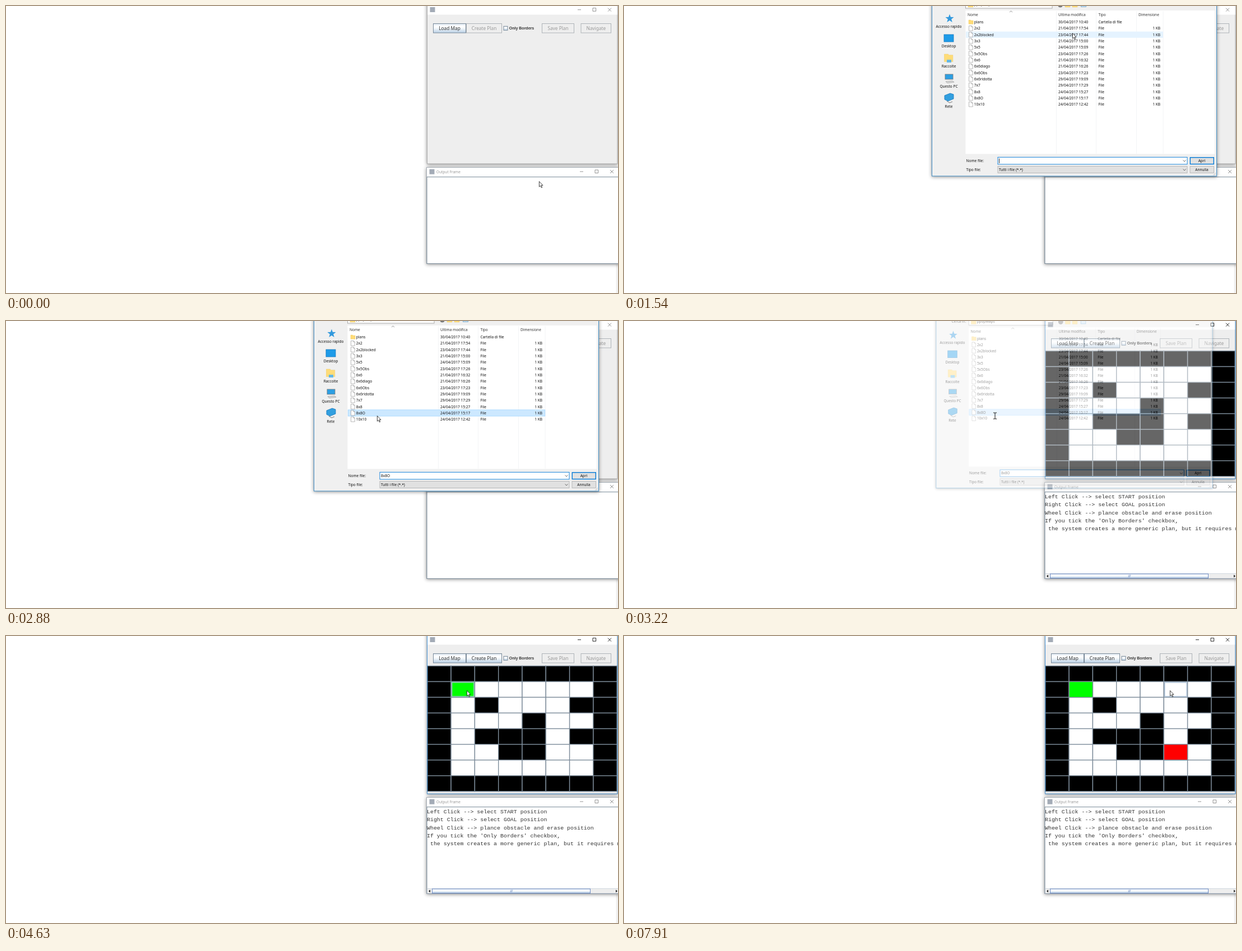
An HTML page that plays this animation: 1092x513 px, repeating every 8 s.

```html
<!DOCTYPE html>
<html lang="en">
<head>
<meta charset="utf-8">
<title>Map planner</title>
<style>
  html, body { margin: 0; width: 100%; height: 100%; overflow: hidden; background: #fff; }
  svg { display: block; width: 1092px; height: 513px; }
  text { white-space: pre; }
  .swing { font: 8.3px "Noto Sans", sans-serif; }
  .ui { font: 6.55px "Noto Sans", "Open Sans", sans-serif; }
  .bold { font: bold 7px "Liberation Sans", sans-serif; }
  .mono { font: 9.94px "Liberation Mono", monospace; }
  .shadow { filter: drop-shadow(0 1px 3px rgba(0, 0, 0, .45)); }
</style>
</head>
<body>
<svg id="stage" viewBox="0 0 1092 513">
  <defs>
    <linearGradient id="metal" x2="0" y2="1">
      <stop offset="0" stop-color="#dfe9f3"/><stop offset=".3" stop-color="#fff"/>
      <stop offset=".5" stop-color="#f4f8fb"/><stop offset="1" stop-color="#b8cfe5"/>
    </linearGradient>
  </defs>
</svg>
<script>
const LOOP = 8000, COL = 42.3, ROW = 28.03, GRID_X = 751.8, GRID_Y = 53.5;
const OPEN = 1320, LOADED = 3220, CLOSED = 3320, START_SET = 4630, GOAL_SET = 7260;
const MAP = ['########', '#......#', '#.#...##', '#...#..#',
             '#.###.##', '#..##..#', '#......#', '########'];

// Pointer positions, each held until the next: [ms, x, y]
const POINTER = [
  [0, 951, 313], [100, 947, 300], [200, 928, 253], [300, 890, 180], [400, 850, 110],
  [500, 815, 56], [570, 799, 25], [670, 798, 33], [770, 799, 41], [1100, 800, 47], [1220, 800, 48],
  [1760, 785, 63], [1880, 737, 108], [1980, 700, 145], [2100, 688, 156], [2200, 685, 158],
  [2660, 673, 164], [2770, 662, 169],
  [3530, 672, 162], [3640, 704, 143], [3740, 752, 122], [3850, 800, 103], [3970, 812, 88],
  [4070, 798, 58], [4190, 780, 38], [4300, 772, 33], [4630, 822, 97],
  [4960, 834, 106], [5080, 868, 130], [5180, 915, 164], [5300, 954, 202], [5400, 977, 224],
  [5520, 984, 230], [5950, 984, 229], [6480, 983, 219], [6600, 981, 204],
  [7790, 978, 150], [7910, 974, 97]
];

const FILES = [
  ['plans', '30/04/2017 10:40'], ['2x2', '21/04/2017 17:54'], ['2x2blocked', '23/04/2017 17:44'],
  ['3x3', '21/04/2017 15:00'], ['5x5', '24/04/2017 15:09'], ['5x5Obs', '23/04/2017 17:26'],
  ['6x6', '21/04/2017 16:32'], ['6x6diago', '21/04/2017 16:26'], ['6x6Obs', '23/04/2017 17:23'],
  ['6x6ridotta', '29/04/2017 19:09'], ['7x7', '29/04/2017 17:29'], ['8x8', '24/04/2017 15:27'],
  ['8x8O', '24/04/2017 15:17'], ['10x10', '24/04/2017 12:42']
];
const FILE_Y = 28.6, FILE_STEP = 11.32, CHOSEN = 12;

const rect = (x, y, w, h, fill, stroke = 'none', extra = '') =>
  `<rect x="${x}" y="${y}" width="${w}" height="${h}" fill="${fill}" stroke="${stroke}" ${extra}/>`;
const path = (d, stroke, fill = 'none', extra = '') =>
  `<path d="${d}" stroke="${stroke}" fill="${fill}" ${extra}/>`;
const text = (x, y, str, cls = 'ui', fill = '#111', anchor = 'start') =>
  `<text x="${x}" y="${y}" class="${cls}" fill="${fill}" text-anchor="${anchor}">${str}</text>`;
const group = (id, body) => `<g id="${id}">${body}</g>`;

const controls = (x, y) =>
  path(`M${x - 3} ${y}h6M${x + 24} ${y - 3}h5.6v5.6h-5.6zM${x + 51} ${y - 3}l6 6m0-6l-6 6`,
       'currentColor', 'none', 'stroke-width=".9"');
const appIcon = (x, y) => rect(x, y, 9, 9, '#a3abb6');

function button(x, w, label, enabled) {
  return rect(x + .5, 31.5, w - 1, 16.5, enabled ? 'url(#metal)' : '#eee', enabled ? '#7a8a99' : '#aeb3b8') +
    text(x + w / 2, 42.9, label, 'swing', enabled ? '#333' : '#999', 'middle');
}

const cell = (col, row, fill) =>
  rect(GRID_X + col * COL, GRID_Y + row * ROW, COL, ROW, fill, '#7f8e9c', 'stroke-width="1.4"');

function mainWindow() {
  const cells = MAP.map((line, r) =>
    [...line].map((ch, c) => cell(c, r, ch === '#' ? '#000' : '#fff')).join('')).join('');
  return rect(751.5, -20, 339.5, 302, '#eee', '#aaa', 'class="shadow"') +
    rect(752, 0, 338.6, 15.5, '#fff') + appIcon(756.5, 2) +
    group('controls', controls(1023, 6.7)) +
    button(762, 59, 'Load Map', true) +
    group('createOff', button(821, 64, 'Create Plan', false)) +
    group('createOn', button(821, 64, 'Create Plan', true)) +
    rect(888, 36.3, 7, 7, 'url(#metal)', '#7a8a99') + text(897.8, 42.3, 'Only Borders', 'bold', '#333') +
    button(956, 58, 'Save Plan', false) + button(1025.5, 54.5, 'Navigate', false) +
    rect(763.3, 32.6, 56.5, 14.4, 'none', '#8fb0d0', 'id="loadHover" stroke-width="1.4"') +
    group('map', cells + group('start', cell(1, 1, '#0f0')) + group('goal', cell(5, 5, '#f00')) +
      rect(0, 0, COL - 3, ROW - 3, 'none', '#a9bfd6', 'id="cellHover" stroke-width="1.4"')) +
    path('M751.5 0V282.2H1091V0', '#4a95d6', 'none', 'id="activeEdge"');
}

function outputWindow() {
  const lines = ['Left Click --> select START position', 'Right Click --> select GOAL position',
    'Wheel Click --> plance obstacle and erase position', "If you tick the 'Only Borders' checkbox,",
    ' the system creates a more generic plan, but it requires more memory'];
  const bar = rect(751.5, 451.5, 341, 8.5, '#eee', '#b8c4d0', 'stroke-width=".6"') +
    rect(760.5, 452, 282, 7.6, 'url(#metal)', '#6382bf', 'stroke-width=".9"') +
    path('M900 458l1.4-4.4m.8 4.4l1.4-4.4', '#6382bf', 'none', 'stroke-width=".8"') +
    path('M757 453.4v5l-3-2.5zM1088 453.4v5l3-2.5z', 'none', '#222');
  return rect(750.5, 288.5, 350, 172, '#fff', '#a5adb5', 'class="shadow"') +
    appIcon(755.5, 291.7) + text(767.8, 298.6, 'Output Frame', 'ui', '#999') +
    `<g color="#888">${controls(1027, 296)}</g>` +
    path('M1092 305.6H751V460.4H1092', '#7a8a99') +
    group('help', lines.map((line, i) =>
      text(751, 317 + i * 14.25, line.replace('>', '&gt;'), 'mono', '#333')).join('') + bar);
}

const folder = (x, y, s = 1) =>
  path(`M${x} ${y}h${4 * s}l${s} ${s}h${4 * s}v${7 * s}h${-9 * s}z`, '#e8c257', '#ffdc78', 'stroke-width=".4"');
const page = (x, y) =>
  path(`M${x} ${y}h4.6l2.2 2.2v6.6h-6.8zm4.6 0v2.2h2.2`, '#999', '#fff', 'stroke-width=".7"');

function sidebar() {
  const star = Array.from({ length: 10 }, (_, i) => {
    const a = i * Math.PI / 5, r = i % 2 ? 3.3 : 8;
    return `${(581 + r * Math.sin(a)).toFixed(1)} ${(22.5 - r * Math.cos(a)).toFixed(1)}`;
  }).join('L');
  const screen = y => rect(573, y, 14, 9, '#2d9fe3', '#777', 'stroke-width=".8"');
  const icons = path(`M${star}z`, 'none', '#3299dd') +
    rect(571, 51, 17, 13, '#1e9be8', '#1779bd', 'stroke-width=".8"') +
    folder(571.5, 86, 1.7) + rect(576, 96, 8, 5, '#64b7e6') +
    screen(122) + path('M574 135l12-1 3 2-12 1.6z', '#888', '#ddd', 'stroke-width=".6"') +
    path('M572 160l10-4 6 2v8l-10 4-6-3z', '#1779bd', '#329fdf', 'stroke-width=".8"') +
    path('M576 170l5 3 5-2', '#777');
  return icons + ['Accesso rapido', 'Desktop', 'Raccolte', 'Questo PC', 'Rete']
    .map((label, i) => text(579.5, 38.6 + i * 35.85, label, 'ui', '#111', 'middle')).join('');
}

function dialog() {
  const rows = FILES.map(([name, date], i) => {
    const mid = FILE_Y + i * FILE_STEP, y = mid + 2.4;
    return (i ? page(615.5, mid - 4.5) : folder(615, mid - 3.5, .9)) + text(624.8, y, name) +
      text(775, y, date) + text(846.5, y, i ? 'File' : 'Cartella di file') +
      (i ? text(957, y, '1 KB', 'ui', '#111', 'end') : '');
  }).join('');
  const heads = [[613, 'Nome'], [775, 'Ultima modifica'], [846.5, 'Tipo'], [918, 'Dimensione']]
    .map(([x, label]) => text(x, 18, label, 'ui', '#333')).join('');
  const down = y => path(`M997.5 ${y}l2.5 2.5 2.5-2.5`, '#444', 'none', 'stroke-width=".8"');
  const tip = rect(687.5, 166.5, 117, 29, '#fff', '#999', 'stroke-width=".8" class="shadow"') +
    ['Tipo - File', 'Dimensione - 935 byte', 'Ultima modifica - 24/04/2017 15:27']
      .map((line, i) => text(690.5, 174 + i * 9, line, 'ui', '#666')).join('');
  return rect(549.5, -62, 508, 366, '#f0f0f0', '#3f8cc4', 'class="shadow"') +
    text(578, -.6, 'Cerca in:') + rect(609.5, -9, 154.5, 13, '#fff', '#999', 'stroke-width=".8"') +
    folder(614, -6) + text(624.5, -.6, 'ppopMaps') +
    '<circle cx="778.5" cy="-2" r="4.5" fill="#777"/>' + folder(787, -6) + folder(800, -6) +
    rect(815.5, -6, 9, 7.5, '#cfe6f7', '#6aa5cf', 'stroke-width=".8"') +
    sidebar() + rect(609.5, 8, 444.5, 256.5, '#fff') +
    path('M771.5 9V264M842.5 9V264M914.5 9V264M962 9V264', '#f0f2f4', 'none', 'stroke-width=".8"') +
    path('M688 11l2.5-2 2.5 2', '#777', 'none', 'stroke-width=".8"') + heads +
    rect(610, 0, 352, 11.2, '#e5f3ff', 'none', 'id="rowHover"') +
    rect(610.3, FILE_Y + CHOSEN * FILE_STEP - 5.6, 351.5, 11.2, '#cce8ff', '#99d1ff', 'id="rowChosen" stroke-width=".7"') +
    rows + group('tip', tip) +
    text(610.5, 279, 'Nome file:') + text(610.5, 295, 'Tipo file:') +
    rect(667, 270.3, 338, 12.6, '#fff', '#0078d7', 'stroke-width=".9"') + down(275.5) +
    rect(667, 286.5, 338, 12, '#e1e1e1', '#adadad', 'stroke-width=".8"') + down(291.5) +
    text(669, 295, 'Tutti i file (*.*)') +
    path('M669.5 272.5v8.5', '#000', 'none', 'id="caret" stroke-width=".8"') +
    group('fileName', text(669, 279, '8x8O')) +
    rect(1010.3, 270.8, 42, 11.8, '#e1e1e1', '#0078d7', 'stroke-width="1.4"') +
    text(1031, 279, 'Apri', 'ui', '#111', 'middle') +
    rect(1010, 286.5, 42.6, 11.8, '#e1e1e1', '#adadad', 'stroke-width=".8"') +
    text(1031, 295, 'Annulla', 'ui', '#111', 'middle') +
    path('M1051 303l5-5m-2.5 5l2.5-2.5', '#bbb', 'none', 'stroke-width=".8"');
}

const stage = document.getElementById('stage');
stage.insertAdjacentHTML('beforeend',
  rect(1088.5, 462, 4, 51, '#f0f0f0') + mainWindow() + outputWindow() + group('dialog', dialog()) +
  group('arrow', path('M.4.6V10.2L2.6 8.2 4.3 11.8 5.7 11.2 4.1 7.6H7z', '#111', '#fff', 'stroke-width=".8"')) +
  group('beam', path('M-3-5.5h2.2l.8.7.8-.7H3M0-5V5M-3 5.5h2.2L0 4.8l.8.7H3', '#111')));

const parts = {};
stage.querySelectorAll('[id]').forEach(el => parts[el.id] = el);
const show = (id, on) => parts[id].setAttribute('visibility', on ? 'visible' : 'hidden');
const put = (id, attrs) => Object.entries(attrs).forEach(([k, v]) => parts[id].setAttribute(k, v));
const within = (t, from, to) => t >= from && t < to;

function dialogPose(t) {
  if (!within(t, OPEN, CLOSED)) return [0, 1];
  if (t < 1430) return [.35, .96];
  if (t < 1540) return [.85, .99];
  if (t < 3100) return [1, 1];
  return t < LOADED ? [.85, .993] : [.4, .971];
}

function render(t) {
  const [, x, y] = POINTER.findLast(p => p[0] <= t);
  const loaded = t >= LOADED, [opacity, scale] = dialogPose(t);

  ['map', 'help', 'createOn', 'activeEdge'].forEach(id => show(id, loaded));
  show('createOff', !loaded);
  show('start', t >= START_SET);
  show('goal', t >= GOAL_SET);
  put('controls', { color: loaded ? '#111' : '#888' });
  show('loadHover', !within(t, OPEN, CLOSED) && x >= 762 && x < 821 && y >= 31 && y <= 48);

  const col = Math.floor((x - GRID_X) / COL), row = Math.floor((y - GRID_Y) / ROW);
  show('cellHover', t >= CLOSED && col >= 0 && col < 8 && row >= 0 && row < 8);
  put('cellHover', { x: GRID_X + col * COL + 1.5, y: GRID_Y + row * ROW + 1.5 });

  put('dialog', {
    opacity, display: opacity ? 'inline' : 'none',
    transform: `translate(803.5 121) scale(${scale}) translate(-803.5 -121)`
  });
  const file = Math.round((y - FILE_Y) / FILE_STEP), chosen = t >= 2770;
  show('rowHover', within(t, 1540, 2770));
  put('rowHover', { y: FILE_Y + file * FILE_STEP - 5.6 });
  show('rowChosen', chosen);
  show('fileName', chosen);
  show('caret', !chosen && !within(t, 1760, 2320));
  show('tip', within(t, 2320, 2660));
  put('tip', { opacity: t < 2440 ? .5 : 1 });

  const overText = within(t, LOADED, 3740);
  show('arrow', !overText);
  show('beam', overText);
  put('arrow', { transform: `translate(${x} ${y})` });
  put('beam', { transform: `translate(${x} ${y + .5})` });
}

function tick() {
  render(performance.now() % LOOP);
  requestAnimationFrame(tick);
}
tick();
</script>
</body>
</html>
```
